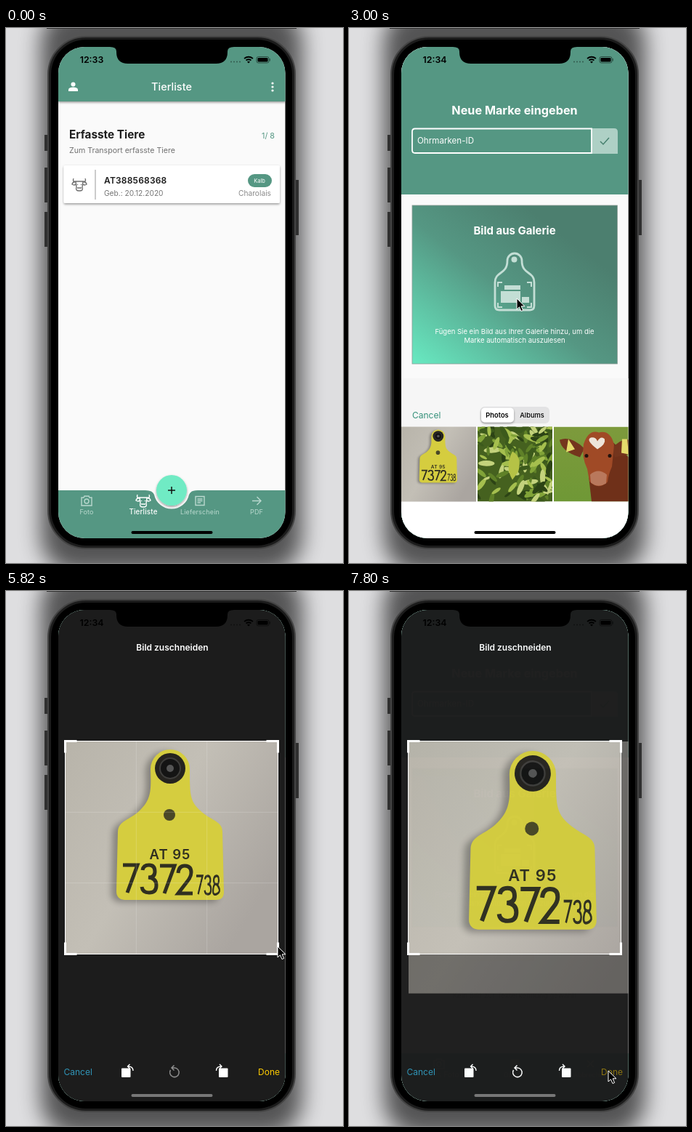
Animation, 464 px wide and 736 px high, one loop 8 s. Source, as an HTML page:

```html
<!DOCTYPE html>
<html lang="de">
<head>
<meta charset="utf-8">
<title>Tierliste</title>
<style>
html, body { margin: 0; width: 100%; height: 100%; overflow: hidden; background: #dedee0; }
svg { display: block; width: 100vw; height: 100vh; }
text { font-family: Inter, "Open Sans", sans-serif; font-size: 10px; }
.b { font-weight: 700; }
.m { font-weight: 600; }
.mid { text-anchor: middle; }
.end { text-anchor: end; }
.line { fill: none; stroke: currentColor; stroke-width: 1.4; }
.nav { fill: #b9d8ce; color: #b9d8ce; text-anchor: middle; }
.nav text { font-size: 9px; letter-spacing: .15px; }
</style>
</head>
<body>
<svg viewBox="0 0 464 736">
<defs>
  <filter id="soft" x="-30%" y="-30%" width="160%" height="160%"><feGaussianBlur stdDeviation="15"/></filter>
  <filter id="blur" x="-30%" y="-30%" width="160%" height="160%"><feGaussianBlur stdDeviation="4"/></filter>
  <filter id="lift" x="-20%" y="-30%" width="140%" height="160%"><feDropShadow dx="0" dy="1.5" stdDeviation="1.5" flood-opacity=".4"/></filter>
  <clipPath id="screenClip"><rect x="72" y="26" width="312.5" height="676" rx="36"/></clipPath>
  <clipPath id="thumbClip"><rect width="103" height="103"/></clipPath>
  <linearGradient id="cardFill" gradientUnits="userSpaceOnUse" x1="110" y1="478" x2="300" y2="230">
    <stop offset="0" stop-color="#68e9c1"/><stop offset=".5" stop-color="#559783"/><stop offset=".85" stop-color="#4c7f6f"/>
  </linearGradient>
  <linearGradient id="wall" x2="1" y2=".6">
    <stop stop-color="#b8b4aa"/><stop offset=".5" stop-color="#c3bfb6"/><stop offset="1" stop-color="#aaa5a0"/>
  </linearGradient>
  <linearGradient id="field" x2="0" y2="1">
    <stop stop-color="#7d9a3c"/><stop offset="1" stop-color="#6f9836"/>
  </linearGradient>

  <path id="cow" class="line" d="M-5-5Q-10-4-8-9M5-5Q10-4 8-9M-5-4Q-9-5-10-1-7 1-5-1M5-4Q9-5 10-1 7 1 5-1M-5-5H5L4 3Q6 8 0 8T-4 3ZM-3 4H3M-2.5-1V0M2.5-1V0"/>
  <g id="camera" class="line"><path d="M-7-5H-4L-3-7H3L4-5H7V6H-7Z"/><circle r="3"/></g>

  <path id="tagShape" d="M117 38A27 27 0 0 1 171 38C171 76 171 84 190 99 203 109 216 111 216 124L218 207Q218 218 207 218L81 218Q70 217 70 206L72 124C73 109 88 108 101 96 118 80 118 68 117 38Z"/>
  <path id="d7" d="M0 0H20L6 38"/>
  <path id="d3" d="M1 7Q2 0 10 0 18 0 18 9 18 17 9 17 20 18 20 28 20 38 10 38 1 38 0 30"/>
  <path id="d2" d="M1 10Q2 0 10 0 19 0 19 9 19 15 14 21L1 38H21"/>
  <path id="d8" d="M10 17Q2 17 2 9T10 0 18 9 10 17 0 28 10 38 20 28 10 17Z"/>
  <g id="tagPhoto">
    <rect width="292" height="292" fill="url(#wall)"/>
    <use href="#tagShape" x="-7" y="3" opacity=".3" filter="url(#blur)"/>
    <use href="#tagShape" fill="#d5cd3f"/>
    <circle cx="144" cy="37" r="21" fill="#25231f"/>
    <circle cx="144" cy="37" r="14" fill="#141414" stroke="#3e3d3b" stroke-width="2"/>
    <circle cx="144" cy="37" r="5" fill="#555"/>
    <circle cx="143" cy="101" r="8" fill="#4a4827"/>
    <text x="144" y="162" class="m mid" fill="#302f20" style="font-size:18.5px;letter-spacing:1px">AT 95</text>
    <g fill="none" stroke="#302f20" stroke-width="5">
      <use href="#d7" x="79" y="170"/><use href="#d3" x="105" y="170"/>
      <use href="#d7" x="130" y="171"/><use href="#d2" x="154" y="171"/>
      <g transform="translate(180 185)scale(.43 .66)">
        <use href="#d7"/><use href="#d3" x="27"/><use href="#d8" x="54"/>
      </g>
    </g>
  </g>
  <g id="calf" clip-path="url(#thumbClip)">
    <rect width="103" height="103" fill="url(#field)"/>
    <path d="M52 103L48 68 80 20 103 42V103Z" fill="#6f3019"/>
    <path d="M42 30Q24 12 8 18 10 34 36 42ZM80 30Q92 16 103 18V38L84 42Z" fill="#74351d"/>
    <path d="M41 24Q48 3 62 8 78 4 83 25L80 55Q75 66 74 76 61 88 49 75L46 58Q38 42 41 24Z" fill="#a04a26"/>
    <path d="M60 31Q43 18 51 15 58 14 60 20 65 12 70 17 72 24 60 31Z" fill="#eee5da"/>
    <path d="M50 66Q61 56 73 66L72 78Q61 85 51 77Z" fill="#b9785c"/>
    <circle cx="45" cy="40" r="2.5" fill="#21120c"/><circle cx="77" cy="40" r="2.5" fill="#21120c"/>
    <path d="M20 17L29 31 17 35ZM94 17H101L103 38 93 36Z" fill="#e5dc6b"/>
  </g>
  <g id="leaves" clip-path="url(#thumbClip)"><rect width="103" height="103" fill="#45611f"/></g>
</defs>

<rect x="48" y="-30" width="360" height="780" rx="50" opacity=".62" filter="url(#soft)"/>
<path d="M56 0H400V1H56Z" fill="#333"/>
<path d="M53 147h5v22h-5zM53 192h5v48h-5zM53 253h5v48h-5zM398 209h5v76h-5z" fill="#303030"/>
<rect x="58" y="12" width="340" height="704" rx="52" fill="#1c1c1c" stroke="#444" stroke-width="2"/>
<rect x="62" y="16" width="332" height="696" rx="48"/>

<g clip-path="url(#screenClip)">
  <g id="listPage">
    <path d="M72 26H385V702H72Z" fill="#fafafa"/>
    <path d="M72 20H385V101H72Z" fill="#559783" filter="url(#lift)"/>
    <path d="M86 87V85Q86 81.500 92.500 81.500T99 85V87Z" fill="#fff"/><circle cx="92.500" cy="77.500" r="3" fill="#fff"/>
    <path d="M367 76v.01M367 81v.01M367 86v.01" stroke="#fff" stroke-width="3.200" stroke-linecap="round"/>
    <text x="228" y="86" class="mid" fill="#fff" style="font-size:14.500px;font-weight:500">Tierliste</text>
    <text x="87" y="152" class="b" fill="#1d1d1d" style="font-size:15.300px">Erfasste Tiere</text>
    <text x="370" y="152" class="end" fill="#559783" style="font-size:10.800px">1/ 8</text>
    <text x="87" y="172" fill="#707070" style="font-size:10.600px">Zum Transport erfasste Tiere</text>
    <rect x="79.500" y="189" width="297.500" height="52" rx="2" fill="#fff" filter="url(#lift)"/>
    <use href="#cow" x="101" y="216" color="#707070"/>
    <path d="M123 195V236" stroke="#999"/>
    <text x="135" y="214" class="m" fill="#1d1d1d" style="font-size:12px;letter-spacing:.2px">AT388568368</text>
    <text x="135" y="231" fill="#757575" style="font-size:10.200px">Geb.: 20.12.2020</text>
    <rect x="333" y="201" width="33" height="18" rx="9" fill="#559783"/>
    <text x="349" y="213" class="mid" fill="#fff" style="font-size:7.500px">Kalb</text>
    <text x="365" y="231" class="end" fill="#8a8a8a" style="font-size:10.200px">Charolais</text>
    <path d="M72 636H192Q202 636 204 642A24.500 24.500 0 0 0 252 642Q254 636 264 636H385V702H72Z" fill="#559783"/>
    <circle cx="228" cy="636" r="21" fill="#70ebc4" filter="url(#lift)"/>
    <path d="M223 636H233M228 631V641" stroke="#111" stroke-width="1.500"/>
    <g class="nav">
      <use href="#camera" x="111" y="651"/><text x="111" y="669">Foto</text>
      <use href="#cow" x="189" y="651" color="#fff"/>
      <text x="189" y="669" fill="#fff" style="font-size:9.800px;font-weight:500">Tierliste</text>
      <path class="line" d="M261 644.500H273V656.500H261ZM263.500 648H270.500M263.500 650.500H270.500M263.500 653H268"/><text x="267" y="669">Lieferschein</text>
      <path class="line" d="M339 650.500H351M345.500 645L351 650.500 345.500 656"/><text x="345" y="669">PDF</text>
    </g>
  </g>

  <g id="entryPage">
    <path d="M72 26H385V702H72Z" fill="#fafafa"/>
    <path d="M72 26H385V229H72ZM72 636H385V702H72Z" fill="#559783"/>
    <text x="228" y="119" class="b mid" fill="#fff" style="font-size:16.200px">Neue Marke eingeben</text>
    <path d="M334 138H365Q370 138 370 143V173H334Z" fill="#aed0c5"/>
    <path d="M334 138.500H91Q87 138.500 87 142.500V168Q87 172 91 172H334Z" fill="none" stroke="#fff" stroke-width="1.800"/>
    <path d="M346 156L350 160 358 151" fill="none" stroke="#47806f" stroke-width="1.500"/>
    <text x="94" y="159" fill="#fff" style="font-size:11.600px">Ohrmarken-ID</text>
    <rect x="87" y="244" width="282.500" height="218" fill="url(#cardFill)" stroke="#8d9c96" stroke-width=".8"/>
    <text x="228" y="284" class="b mid" fill="#fff" style="font-size:15px">Bild aus Galerie</text>
    <g fill="none" stroke="#c3ded5" stroke-width="2.800">
      <path d="M218 320A10 10 0 0 1 238 320C238 340 255 334 255 350V382Q255 388 249 388H207Q201 388 201 382V350C201 334 218 340 218 320Z"/>
      <path d="M205 356V350H211M245 350H251V356M205 378V384H211M245 384H251V378" stroke-width="2"/>
    </g>
    <path d="M214 354h22v6h-22zM209 362h27v16h-27zM238 370h10v8h-10z" fill="#c3ded5"/><circle cx="227.500" cy="318.500" r="4" fill="#c3ded5"/>
    <g class="mid" fill="#fff"><text x="228" y="421" style="font-size:9.500px">Fügen Sie ein Bild aus Ihrer Galerie hinzu, um die</text>
    <text x="228" y="433" style="font-size:9.500px">Marke automatisch auszulesen</text></g>
    <text x="228" y="560" class="mid" fill="#8c8c8c" style="font-size:9.900px">Kein Bild zur Texterkennung gewählt</text>
    <g class="nav">
      <use href="#camera" x="124" y="651"/><text x="124" y="669" style="font-size:10px">Neues Foto</text>
      <rect x="222" y="644.500" width="13" height="12.500" rx="1.500"/><path d="M224 655L227 651 229 653 231.500 649.500 234 655Z" fill="#559783"/><text x="228" y="669" style="font-size:8.500px">Galerie</text>
      <path class="line" d="M328 646L337 655M337 646L328 655"/><text x="332.500" y="669" style="font-size:8.700px">Abbrechen</text>
    </g>
  </g>

  <g id="picker">
    <path d="M72 26H385V702H72Z" fill="#fff"/><path d="M72 26H385V92H72Z" fill="#f6f6f6"/>
    <text x="87" y="81" fill="#35917a" style="font-size:12px">Cancel</text>
    <rect x="180.500" y="65" width="95.500" height="23" rx="6" fill="#e3e3e4"/>
    <rect x="182" y="66.500" width="45" height="20" rx="5" fill="#fff" filter="url(#lift)"/>
    <text x="204" y="80" class="m mid" style="font-size:9.300px">Photos</text>
    <text x="252" y="80" class="mid" style="font-size:9.300px;font-weight:500">Albums</text>
    <use href="#tagPhoto" transform="translate(72 92.500)scale(.353)"/>
    <use href="#leaves" x="177" y="92.500"/><use href="#calf" x="282" y="92.500"/>
  </g>

  <g id="cropper">
    <path d="M72 26H385V702H72Z" fill="#1c1c1c"/>
    <use id="cropPhoto" href="#tagPhoto"/>
    <path id="dim" fill="#1c1c1c" fill-rule="evenodd" opacity=".5"/>
    <path id="grid" fill="none" stroke="#fff" stroke-width=".8"/>
    <path id="frame" fill="none" stroke="#fff"/>
    <path id="corners" fill="none" stroke="#fff" stroke-width="3"/>
    <text id="cropTitle" x="229" y="82" class="m mid" fill="#fff" style="font-size:12px">Bild zuschneiden</text>
    <text x="79.500" y="666" fill="#3095b8" style="font-size:12px">Cancel</text>
    <text id="done" x="377" y="666" class="end" fill="#fc0" style="font-size:12px">Done</text>
    <g id="turn"><rect x="159" y="656.500" width="12.500" height="12.500" rx="1" fill="#fff"/>
    <path d="M175 660Q175 654 168 654M170.500 651L167.500 654 170.500 657" fill="none" stroke="#fff" stroke-width="1.400"/></g>
    <use href="#turn" transform="matrix(-1 0 0 1 464.500 0)"/>
    <path id="reset" d="M226.500 659A6.300 6.300 0 1 0 232 656H228M231.500 652.500L228 656 231.500 659.500" fill="none" stroke="#fff" stroke-width="1.500"/>
  </g>

  <path d="M143 26Q152 26 152 32V33Q152 49 168 49H289Q305 49 305 33V32Q305 26 314 26Z"/>
  <text id="clock" x="118" y="48" class="m mid" style="font-size:12.400px"></text>
  <path d="M310 46.500v.01M314 46.500v.01M318 46.500v.01M322 46.500v.01" stroke="#000" stroke-width="2" stroke-linecap="round" opacity=".4"/>
  <path d="M328 42Q334 37.500 340 42M330.500 44.500Q334 42 337.500 44.500" fill="none" stroke="#000" stroke-width="1.800"/><path d="M332 46.500Q334 45 336 46.500L334 48.500Z"/>
  <rect x="345" y="39.500" width="17" height="8.500" rx="2.500" fill="none" stroke="#000" stroke-opacity=".5"/>
  <rect x="346.500" y="41" width="14" height="5.500" rx="1.300"/><path d="M363.300 42V45.500" stroke="#000" stroke-opacity=".5"/>
  <rect id="homeBar" x="172.500" y="692" width="112" height="4" rx="2"/>
</g>
<g id="cursor">
  <circle id="ring" r="21" fill="#fff" fill-opacity=".25" stroke="#111" stroke-width="1.600"/>
  <path d="M0 0V15L3.500 11.800 6 17.500 8.600 16.400 6.200 10.800H11Z" stroke="#fff"/>
</g>
</svg>
<script>
const LOOP = 8000, TICK = 60;
const $ = id => document.getElementById(id);
const set = (id, attrs) => { for (const k in attrs) $(id).setAttribute(k, attrs[k]); };
const show = (id, on) => set(id, { visibility: on ? 'visible' : 'hidden' });
const ramp = (t, a, b) => Math.min(1, Math.max(0, (t - a) / (b - a)));
const smooth = p => p * p * (3 - 2 * p);
const easeOut = p => 1 - (1 - p) ** 3;

// Last value whose start time has passed.
const step = (t, start, list) => list.reduce((v, [at, next]) => t >= at ? next : v, start);

const cursorPath = [
  [540, 234, 702], [1080, 224, 640], [2040, 224, 640], [2100, 219, 600], [2700, 231, 372],
  [3480, 231, 372], [4140, 127, 153], [4860, 127, 153], [4920, 133, 165], [5580, 374, 489],
  [5820, 374, 489], [6360, 326, 441], [6720, 326, 441], [7320, 357, 660]
];
function cursorAt(t) {
  const i = cursorPath.findIndex(k => k[0] > t);
  if (i < 0) return cursorPath.at(-1).slice(1);
  if (i === 0) return cursorPath[0].slice(1);
  const [a, x, y] = cursorPath[i - 1], [b, x2, y2] = cursorPath[i];
  const p = smooth(ramp(t, a, b));
  return [x + (x2 - x) * p, y + (y2 - y) * p];
}

function growLeaves() {
  let seed = 7;
  const rnd = () => (seed = seed * 16807 % 2147483647) / 2147483647;
  const colors = ['#2c4315', '#5f8128', '#81a338', '#a5bf4e', '#3c5a1c', '#c3d27c'];
  let leaves = '';
  for (let i = 0; i < 130; i++) {
    const x = rnd() * 103, y = rnd() * 103, angle = rnd() * 180, size = 5 + rnd() * 7;
    leaves += `<ellipse rx="${size}" ry="${size / 3}" fill="${colors[i % 6]}" transform="translate(${x} ${y})rotate(${angle})"/>`;
  }
  $('leaves').innerHTML += leaves + '<path d="M48 34Q62 42 56 62L48 73Q37 55 48 34Z" fill="#b5c246"/>';
}

function drawCrop(t) {
  const left = 82, top = 207, full = 292, small = 246;
  const drag = smooth(ramp(t, 5820, 6330));
  const scale = 1 + smooth(ramp(t, 7140, 7500)) * (full / small - 1);
  const w = (full - (full - small) * drag) * scale;
  const third = w / 3, arm = 16;
  const l = left - .5, u = top - .5, r = left + w + .5, d = top + w + .5;
  set('cropPhoto', { transform: `translate(${left} ${top})scale(${scale})` });
  set('dim', { d: `M72 26H385V702H72ZM${left} ${top}h${w}v${w}h${-w}Z` });
  set('frame', { d: `M${l} ${u}H${r}V${d}H${l}Z` });
  set('corners', { d: `M${l} ${u + arm}V${u}H${l + arm}M${r - arm} ${u}H${r}V${u + arm}M${r} ${d - arm}V${d}H${r - arm}M${l + arm} ${d}H${l}V${d - arm}` });
  set('grid', {
    d: [1, 2].map(n => `M${left + n * third} ${top}v${w}M${left} ${top + n * third}h${w}`).join(''),
    opacity: .45 * (ramp(t, 5760, 5880) - ramp(t, 6660, 6900))
  });
}

function render(t) {
  set('entryPage', { opacity: step(t, 0, [[1500, .35], [1560, .9], [1800, 1]]) });
  $('clock').textContent = t < 2580 ? '12:33' : '12:34';

  const sheet = step(t, 676, [[2940, 600], [3000, 456], [3120, 65], [3300, 0], [4380, 8], [4440, 29], [4680, 420], [4740, 676]]);
  set('picker', { transform: `translate(0 ${sheet})` });
  show('picker', sheet < 676);

  set('cropper', { opacity: easeOut(ramp(t, 4680, 5040)) - step(t, 0, [[7740, .02]]) });
  show('cropper', t > 4680);
  drawCrop(t);
  set('cropTitle', { opacity: ramp(t, 4980, 5220) });
  set('done', { opacity: t < 7560 ? 1 : .5 });
  set('reset', { opacity: t < 5880 ? .5 : 1 });
  set('homeBar', { fill: t < 4740 ? '#000' : '#777' });

  set('cursor', { transform: `translate(${cursorAt(t)})` });
  show('cursor', t >= 540);
  set('ring', { opacity: t >= 4200 && t < 4380 ? 1 : 0 });
}

growLeaves();
const begin = performance.now();
function loop() {
  const t = (performance.now() - begin) % LOOP;
  render(Math.floor(t / TICK) * TICK);
  requestAnimationFrame(loop);
}
loop();
</script>
</body>
</html>
```
